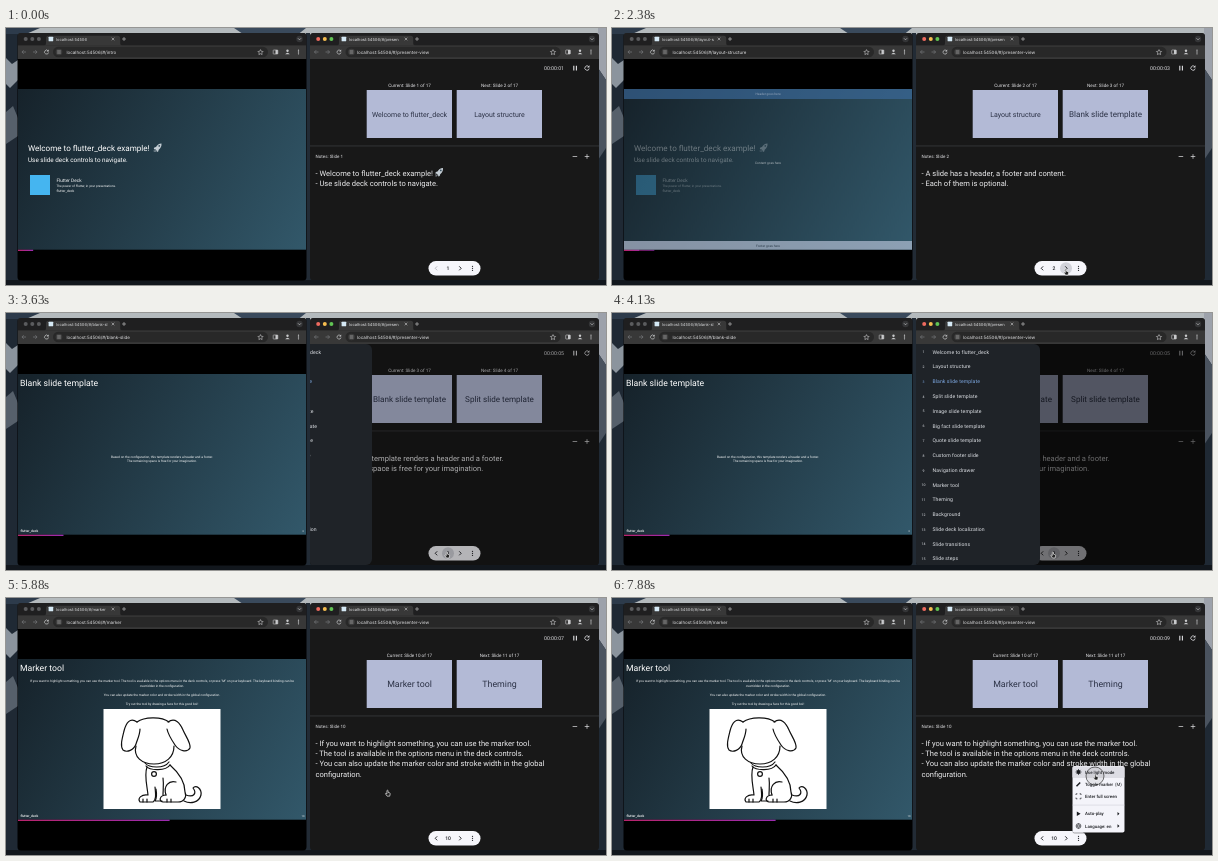
An HTML page that plays this animation: 600x257 px, repeating every 8000 ms.

```html
<!DOCTYPE html>
<html lang="en">
<head>
<meta charset="utf-8">
<title>Presenter view</title>
<style>
  html, body { margin: 0; width: 100%; height: 100%; overflow: hidden; background: #161c23; }
  svg { display: block; width: 100%; height: 100%; }
  text { font-family: Roboto, sans-serif; white-space: pre; text-rendering: geometricPrecision; }
  .ui { font-family: Inter, sans-serif; }
</style>
</head>
<body>
<svg id="stage" viewBox="0 0 600 257"></svg>
<script>
const LOOP = 8000, STEP = 125;
const stage = document.getElementById('stage');

const clamp = v => Math.max(0, Math.min(1, v));
const ramp = (t, start, length) => clamp((t - start) / length);
const smooth = v => v * v * (3 - 2 * v);

// SVG markup helpers
const rect = (x, y, w, h, fill, r = 0, more = '') =>
  `<rect x="${x}" y="${y}" width="${w}" height="${h}" rx="${r}" fill="${fill}" ${more}/>`;
const dot = (x, y, r, fill, more = '') => `<circle cx="${x}" cy="${y}" r="${r}" fill="${fill}" ${more}/>`;
const line = (d, color, width = 0.7, more = '') =>
  `<path d="${d}" fill="none" stroke="${color}" stroke-width="${width}" ${more}/>`;
const shape = (d, fill) => `<path d="${d}" fill="${fill}"/>`;
const text = (x, y, size, str, fill = '#fff', more = '') =>
  `<text x="${x}" y="${y}" font-size="${size}" fill="${fill}" ${more}>${str}</text>`;
const MID = 'text-anchor="middle"';
const group = (id, body, more = '') => `<g id="${id}" ${more}>${body}</g>`;
const dots = (x, y, fill, gap = 1.8) => [-gap, 0, gap].map(d => dot(x, y + d, 0.65, fill)).join('');
const at = (x, y, body, scale = 1) => `<g transform="translate(${x} ${y}) scale(${scale})">${body}</g>`;
const reload = (x, y, color, s = 1) =>
  at(x, y, line('M1.6-1.2A2 2 0 1 0 2 .5', color, 0.7) + shape('M2.2-2.4V-.4H.2Z', color), s);

const rocket = (x, y) => at(x, y,
  shape('M7.5-7C5-7 3-5.4 2-3.4L.3-3-.2-1.6 1.3-1.2 2.5 0 2.9 1.5 4.2 1 4.7-.8C6.7-2 7.7-4.4 7.5-7Z', '#c4cdd4') +
  dot(5.3, -4.6, 0.9, '#3c5361') + line('M1.6-.4 0 1.4M.9-.8-.4.2M2-.1 1 1.5', '#aeb8c0', 0.6));

const SLIDES = {
  1: { start: -1000, path: 'intro', tab: '', title: 'Welcome to flutter_deck', size: 7,
       next: 'Layout structure', nextSize: 7,
       notes: ['- Welcome to flutter_deck example!', '- Use slide deck controls to navigate.'] },
  2: { start: 2050, path: 'layout-structure', tab: '/#/layout-s', title: 'Layout structure', size: 7,
       next: 'Blank slide template', nextSize: 8.1,
       notes: ['- A slide has a header, a footer and content.', '- Each of them is optional.'] },
  3: { start: 2500, path: 'blank-slide', tab: '/#/blank-sl', title: 'Blank slide template', size: 8.1,
       next: 'Split slide template', nextSize: 8.1,
       notes: ['- The blank slide template renders a header and a footer.',
               '- The remaining space is free for your imagination.'] },
  10: { start: 5100, path: 'marker', tab: '/#/marker', title: 'Marker tool', size: 8.8,
        next: 'Theming', nextSize: 8.8,
        notes: ['- If you want to highlight something, you can use the marker tool.',
                '- The tool is available in the options menu in the deck controls.',
                '- You can also update the marker color and stroke width in the global', 'configuration.'] }
};
const FADE = 500;

const AGENDA = ['Welcome to flutter_deck', 'Layout structure', 'Blank slide template', 'Split slide template',
  'Image slide template', 'Big fact slide template', 'Quote slide template', 'Custom footer slide',
  'Navigation drawer', 'Marker tool', 'Theming', 'Background', 'Slide deck localization',
  'Slide transitions', 'Slide steps'];

function wallpaper() {
  return rect(0, 0, 600, 257, '#1f2934') +
    rect(20, 0, 580, 8, '#b4babd') +
    shape('M0 0H34L20 6H0Z', '#2d3b4b') +
    shape('M228 0H300L290 8H240Z', '#3a4a5c') +
    shape('M592 0H600V52L592 40Z', '#9da2ab') +
    shape('M592 40 600 52V120L592 132Z', '#4a535f') +
    shape('M0 30 6 36 12 32V52L4 60 0 56Z', '#8b949d') +
    shape('M0 84 7 78 12 90V108L0 116Z', '#56606b') +
    rect(300, 5, 4, 247, '#222b35') + rect(0, 252, 600, 5, '#12171d');
}

function chrome(x, lights, tabX, url) {
  const ink = '#c9cacc', faint = '#77797c', bar = '#383838', right = x + 288;
  return rect(x, 5, 289, 26, bar) + rect(x, 5, 289, 12.4, '#1f1f20') +
    lights.map((c, i) => dot(x + 8.2 + i * 6.6, 11, 2, c)).join('') +
    shape(`M${tabX - 7} 17.4q2 0 2-2v-5q0-2.6 2.6-2.6h69q2.6 0 2.6 2.6v5q0 2 2 2Z`, bar) +
    rect(tabX - 2.4, 8.7, 4.6, 4.6, '#d5e9f5', 0.6) +
    line(`M${tabX + 60.7} 9.7l2.6 2.6m0-2.6l-2.6 2.6M${tabX + 71} 11h4m-2-2v4`, ink, 0.6) +
    dot(right - 6, 11, 3.2, '#343537') + line(`M${right - 7.5} 10.3l1.5 1.5 1.5-1.5`, ink) +
    line(`M${x + 8.5} 24h-4m1.7-1.8-1.8 1.8 1.8 1.8`, faint) +
    line(`M${x + 15.5} 24h4m-1.7-1.8 1.8 1.8-1.8 1.8`, faint) + reload(x + 29, 24, ink) +
    rect(x + 35.5, 18.8, 215, 10.4, '#282828', 5.2) + dot(x + 41.5, 24, 3.3, '#3c3c3c') +
    line(`M${x + 39.7} 23h3.6m-3.6 2h3.6`, ink, 0.6) +
    text(url.x, 25.6, 4.48, '', '#e4e5e7', `id="${url.id}" class="ui"`) +
    line(`M${x + 243} 21.6l.8 1.7 1.8.2-1.3 1.3.3 1.8-1.6-.9-1.6.9.3-1.8-1.3-1.3 1.8-.2Z`, ink, 0.6) +
    rect(x + 255.7, 22, 4.6, 4, 'none', 0.5, `stroke="${ink}" stroke-width=".6"`) + rect(x + 258, 22, 2.3, 4, ink) +
    dot(x + 270, 22.8, 1.2, ink) + shape(`M${x + 267.7} 26.2q2.3-3 4.6 0Z`, ink) +
    dots(x + 281, 24, ink);
}

const slideBase = n => rect(12, 61, 288, 162, 'url(#deck)') + rect(12, 221.7, 288, 1.3, '#000') +
  rect(12, 221.7, 15.16 * n, 1.3, 'url(#bar)');
const header = str => text(14, 73, 8.7, str);
const footer = n => text(14.5, 219.4, 3.35, 'flutter_deck', '#fff', 'font-weight="500"') +
  text(297, 219.4, 2.6, n, '#fff', MID);
const centered = (y, str, fill) => text(156, y, 3.22, str, fill, MID);

const puppy = rect(97.5, 111, 117, 100, '#fff') + `<g fill="none" stroke="#111" stroke-width="1.2" stroke-linejoin="round" stroke-linecap="round">` + [
  'M131 124C138 119 155 118 163 124',
  'M131 124C124 119 120 125 118 133C116 141 114 148 117 152C121 155 128 152 130 146C132 140 134 136 134 131',
  'M162 124C169 119 174 125 177 132C180 139 185 145 184 150C181 155 173 153 169 147C165 141 162 136 161 131',
  'M130 148C127 159 136 166 148 166C160 166 168 159 168 148',
  'M139 165C143 170 158 171 163 164M140 168C144 173 160 173 164 167',
  'M141 169C138 177 141 187 142 197C136 196 131 200 134 204H147C150 202 150 198 149 189',
  'M164 167C172 174 179 184 179 194C181 199 178 204 172 204H157C152 203 154 197 160 197',
  'M160 197C157 188 163 182 170 184M150 191C151 197 151 200 149 203H156M157 180C158 187 157 192 157 197',
  'M180 197C188 200 191 195 187 190C190 186 196 191 195 197C193 205 184 206 178 203',
  'M137 201v3M141 201v3M161 201v3M165 201v3'
].map(d => `<path d="${d}"/>`).join('') + '<circle cx="148" cy="176" r="2.4"/></g>';

const DECK = {
  1: slideBase(1) + text(22, 123, 8.1, 'Welcome to flutter_deck example!') + rocket(148, 122.5) +
     text(22, 133.6, 6.35, 'Use slide deck controls to navigate.') + rect(24, 147, 20, 20, '#45b5f0') +
     text(50.5, 154.4, 4.7, 'Flutter Deck') + text(50.5, 159.3, 3.15, 'The power of Flutter, in your presentations.') +
     text(50.5, 163.9, 3.4, 'flutter_deck'),
  2: slideBase(2) + rect(12, 61, 288, 10, '#3b6a9c') + rect(12, 213, 288, 8.7, '#bdc7dc') +
     centered(67, 'Header goes here', '#d5e3ff') + centered(136, 'Content goes here') +
     centered(218.6, 'Footer goes here', '#27313f'),
  3: slideBase(3) + header('Blank slide template') + footer(3) +
     centered(144.5, 'Based on the configuration, this template renders a header and a footer.') +
     centered(149, 'The remaining space is free for your imagination.'),
  10: slideBase(10) + header('Marker tool') + footer(10) +
     centered(84.2, 'If you want to highlight something, you can use the marker tool. The tool is available in the options menu in the deck controls, or press "M" on your keyboard. The keyboard binding can be') +
     centered(88.5, 'overridden in the configuration.') +
     centered(98, 'You can also update the marker color and stroke width in the global configuration.') +
     centered(107.2, 'Try out the tool by drawing a face for this good boi!') + puppy
};

function presenter() {
  const ink = '#e2e2e5', card = '#b3bad6';
  return rect(304, 31, 289, 221, '#181818') + text(538, 41.8, 5.2, '', ink, 'id="clock"') +
    line('M567.8 37.8v4.6M570.4 37.8v4.6', ink, 1.1) + reload(581, 40, ink, 1.1) +
    text(403.5, 58.5, 4.6, '', ink, `id="current" ${MID}`) + text(493.5, 58.5, 4.6, '', ink, `id="next" ${MID}`) +
    rect(360.7, 62, 85.3, 48, card) + rect(450.7, 62, 85.3, 48, card) +
    text(403.5, 88.8, 8, '', '#2b3145', `id="cardA" ${MID}`) + text(493.5, 88.8, 8, '', '#2b3145', `id="cardB" ${MID}`) +
    rect(304, 117.6, 289, 0.7, '#3e3f42') + text(309.5, 130.4, 4.5, '', ink, 'id="noteTitle"') +
    line('M566.6 128.5h4.6M578.7 128.5h4.6m-2.3-2.3v4.6', ink, 0.7) +
    [0, 1, 2, 3].map(i => text(309.5, 147.5 + i * 10.4, 7.55, '', '#ececee', `id="note${i}"`)).join('') +
    group('noteRocket', rocket(429.5, 147)) +
    rect(422.5, 233, 52, 14.6, '#f6f6fb', 7.3) + dot(454, 240.3, 6, '#d2d3da', 'id="hover"') +
    line('M431.2 238.3l-2 2 2 2', '#1b1c20', 0.9, 'id="prev"') + line('M453.2 238.3l2 2-2 2', '#1b1c20', 0.9) +
    text(442, 242.1, 5, '', '#1b1c20', `id="page" ${MID} font-weight="500"`) + dots(466.5, 240.3, '#1b1c20', 2) +
    group('tip', rect(444.5, 225, 20, 7.6, '#3b3d41', 1.3) + text(454.5, 230.2, 4, 'Next (→)', '#8e9094', MID)) +
    rect(304, 31, 289, 221, '#000', 0, 'id="scrim"') + group('drawer', drawer()) + group('menu', menu());
}

function drawer() {
  return rect(290, 31, 138, 221, '#1f2328', 6) + rect(304, 164.5, 122, 14.5, '#4a4e53', 0, 'id="rowHover"') +
    AGENDA.map((name, i) => {
      const y = 40.7 + i * 14.77, color = i === 2 ? '#7fabe6' : '#dfe2e7';
      return text(311.5, y - 0.3, 3.5, i + 1, color, MID) +
        text(320.5, y, 5.1, name, color, 'letter-spacing=".08"');
    }).join('');
}

function menu() {
  const ink = '#1a1c20';
  const rows = [[174, 'Use light mode'], [186.2, 'Toggle marker'], [198.4, 'Enter full screen'], [215.7, 'Auto-play'], [228, 'Language: en']];
  const rays = [0, 45, 90, 135].map(a => line('M-3 0H3', ink, 0.7, `transform="rotate(${a})"`)).join('');
  return rect(460.5, 168.5, 52.5, 67, '#000', 2, 'opacity=".35"') + rect(460.5, 168, 52, 66.5, '#f4f4fa', 1.8) +
    rect(460.5, 168.6, 52, 11.4, '#dddde4', 1.5, 'id="menuHover"') + rect(460.5, 206.8, 52, 0.5, '#c7c8cf') +
    rows.map(([y, name]) => text(473, y + 1.6, 4.4, name, ink, 'font-weight="500"')).join('') +
    text(509.8, 187.8, 4.4, '(M)', ink, 'text-anchor="end"') +
    shape('M505.5 213.9l2 1.8-2 1.8ZM505.5 226.2l2 1.8-2 1.8Z', ink) +
    at(466.5, 174, rays + dot(0, 0, 1.9, ink)) +
    line('M464.5 188.2l3.7-3.7', ink, 1.5) +
    line('M464 197v-1.2h1.4m2.2 0h1.4v1.2m0 2.6v1.2h-1.4m-2.2 0h-1.4v-1.2', ink, 0.7) +
    shape('M464.8 213.4l3.8 2.3-3.8 2.3Z', ink) +
    dot(466.5, 228, 2.4, 'none', `stroke="${ink}" stroke-width=".6"`) +
    line('M464.1 228h4.8M466.5 225.6q-2.2 2.4 0 4.8q2.2-2.4 0-4.8', ink, 0.5);
}

const grad = (id, box, a, b, units) => `<linearGradient id="${id}" ${box} ${units}>` +
  `<stop stop-color="${a}"/><stop offset="1" stop-color="${b}"/></linearGradient>`;
const clip = (id, x) => `<clipPath id="${id}">${rect(x, 5, 289, 247.5, '#000', 3.5)}</clipPath>`;

stage.innerHTML = '<defs>' +
  grad('deck', 'x1="12" y1="61" x2="300" y2="222"', '#16222a', '#32586a', 'gradientUnits="userSpaceOnUse"') +
  grad('bar', '', '#b8246c', '#9c2bb0', '') + clip('leftClip', 11.5) + clip('rightClip', 304) + '</defs>' +
  wallpaper() +
  `<g clip-path="url(#leftClip)">${rect(11, 5, 290, 248, '#000')}` +
  chrome(11.5, ['#5b5c5e', '#5b5c5e', '#5b5c5e'], 45, { x: 60.5, id: 'url' }) +
  text(50, 12.5, 4.05, '', '#d9dadc', 'id="tab" class="ui"') +
  Object.keys(DECK).map(n => group('deck' + n, DECK[n])).join('') + '</g>' +
  `<g clip-path="url(#rightClip)">` +
  chrome(304, ['#ee6a5f', '#f5bd4f', '#61c454'], 338, { x: 351, id: 'viewUrl' }) +
  text(343, 12.5, 4.05, 'localhost:54506/#/presen', '#e4e5e7', 'class="ui"') + presenter() + '</g>' +
  dot(483, 178, 9, '#777', 'id="ring" fill-opacity=".12" stroke="#333" stroke-width=".7"') +
  group('hand', '<path d="M-.7-2.6q.6-.7 1.2 0V-.8l1.6.5q.6.3.5 1L2.1 3H-.5L-2.1.7q0-.8.8-.5l.6.5Z" fill="#222" stroke="#fff" stroke-width=".6"/>') +
  group('caret', line('M-1-2.4q1 0 1 .8V1.6q0 .8-1 .8M1-2.4q-1 0-1 .8V1.6q0 .8 1 .8', '#ddd', 0.6));

const el = {};
stage.querySelectorAll('[id]').forEach(node => { el[node.id] = node; });
const show = (id, on) => { el[id].style.opacity = +on; };
const write = (id, str, size) => {
  el[id].textContent = str;
  if (size) el[id].setAttribute('font-size', size);
};
write('viewUrl', 'localhost:54506/#/presenter-view');

// time, x, y
const POINTER = [[500, 480, 188], [1250, 454, 243], [3000, 454, 243], [3375, 441, 241], [4250, 441, 241],
  [4875, 334, 172], [5120, 334, 172], [5375, 347, 176], [5600, 347, 176], [6375, 467, 239],
  [6900, 467, 239], [7600, 483.5, 178], [8000, 483.5, 178]];

function pointerAt(t) {
  const i = Math.max(1, POINTER.findIndex(k => k[0] > t));
  const [t0, x0, y0] = POINTER[i - 1], [t1, x1, y1] = POINTER[i];
  const p = smooth(ramp(t, t0, t1 - t0));
  return [x0 + (x1 - x0) * p, y0 + (y1 - y0) * p];
}

function draw(t) {
  const n = Object.keys(SLIDES).filter(k => SLIDES[k].start <= t).pop();
  const slide = SLIDES[n];
  for (const k in SLIDES) show('deck' + k, ramp(t, SLIDES[k].start, FADE));
  write('url', 'localhost:54506/#/' + slide.path);
  write('tab', 'localhost:54506' + slide.tab);
  write('clock', '00:00:0' + Math.floor(t / 1000 + 1.5));
  write('current', `Current: Slide ${n} of 17`);
  write('next', `Next: Slide ${+n + 1} of 17`);
  write('cardA', slide.title, slide.size);
  write('cardB', slide.next, slide.nextSize);
  write('noteTitle', 'Notes: Slide ' + n);
  for (let i = 0; i < 4; i++) write('note' + i, slide.notes[i] || '');
  show('noteRocket', n === '1');
  write('page', n);
  el.prev.setAttribute('stroke', n === '1' ? '#b4b5bb' : '#1b1c20');

  const open = smooth(ramp(t, 3500, 250)) - ramp(t, 5165, 246);
  el.drawer.setAttribute('transform', `translate(${(open - 1) * 124} 0)`);
  show('drawer', open > 0);
  show('scrim', open * 0.54);
  show('rowHover', t >= 4850);
  show('menu', ramp(t, 6450, 200));
  show('menuHover', t >= 7500);
  show('tip', ramp(t, 1700, 250) * (t < 2050));

  const [x, y] = pointerAt(t);
  const target = [442, 454, 466.5].find(c => Math.hypot(x - c, y - 240.3) < 6);
  show('hover', t >= 500 && target !== undefined);
  if (target) el.hover.setAttribute('cx', target);
  const overText = t > 5200 && t < 5900 && y < 183;
  for (const id of ['hand', 'caret']) {
    el[id].setAttribute('transform', `translate(${x} ${y + 1})`);
    show(id, t >= 500 && (id === 'caret') === overText);
  }
  show('ring', t >= 7700);
}

const begin = performance.now();
function tick(now) {
  const t = Math.max(0, now - begin) % LOOP;
  draw(Math.floor(t / STEP) * STEP);
  requestAnimationFrame(tick);
}
draw(0);
requestAnimationFrame(tick);
</script>
</body>
</html>
```
